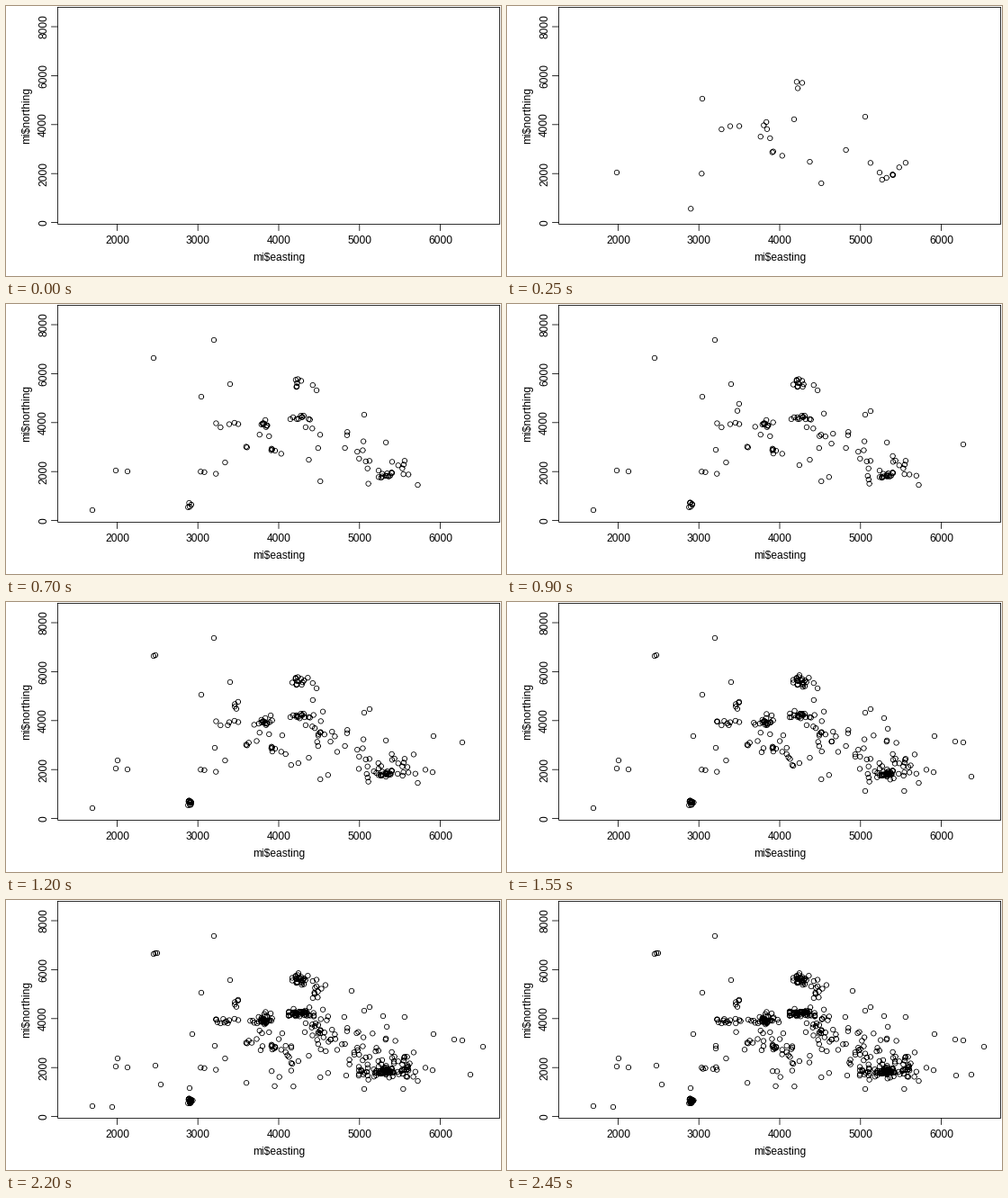
A matplotlib script that plays this animation: 550x300 px, repeating every 2.5 s.

```python
import numpy as np
import matplotlib.pyplot as plt
from matplotlib.animation import FuncAnimation

W, H, DPI = 550, 300, 100
PX = 72 / DPI  # points per pixel
FRAMES, STEP = 50, 50
RADIUS, STROKE = 2.7, 0.8
LEFT, RIGHT, TOP, BOTTOM = 57.6, 548.6, 1.4, 242.4
TICK = 7.2

plt.rcParams.update({"font.family": "Liberation Sans", "path.simplify": False})

# Lone sightings in order of arrival, in pixels.
OUTLIERS = np.array([
    (398, 123), (122, 185), (217, 103), (164, 60), (135, 186), (96, 229),
    (249, 89), (231, 40), (404, 119), (507, 156),
    (166, 59), (475, 149), (124, 176),
    (498, 155), (207, 149), (419, 129), (516, 194),
    (118, 230), (168, 59), (166, 184),
    (530, 163), (172, 205), (384, 101), (204, 209), (499, 195),
])

# Busy areas: centre, spread and weight.
AREAS = np.array([
    (328, 88, 5, 4, 28),
    (346, 101, 5, 7, 18),
    (328, 126, 7, 3, 36),
    (290, 132, 6, 3, 32),
    (253, 134, 13, 1.5, 26),
    (257, 116, 3, 3, 9),
    (350, 142, 9, 13, 34),
    (301, 161, 8, 4, 20),
    (228, 187, 7, 2, 10),
    (205, 223, 1.5, 1.5, 14),
    (424, 191, 5, 2.5, 40),
    (442, 188, 12, 7, 38),
    (402, 192, 12, 4, 24),
    (410, 170, 32, 20, 50),
    (300, 165, 34, 24, 40),
])


def total(frame):
    """Clustered points visible so far; they arrive slightly faster with time."""
    return int(5.5 * frame + 0.05 * frame ** 2)


def scatter(n, rng):
    """Random points drawn around the busy areas."""
    weight = AREAS[:, 4] / AREAS[:, 4].sum()
    area = AREAS[rng.choice(len(AREAS), n, p=weight)]
    shift = np.clip(rng.normal(size=(n, 2)), -2, 2)
    return area[:, :2] + shift * area[:, 2:4]


def rings(centres):
    """Outlines of all circles as one line, broken by NaN."""
    turn = np.append(np.linspace(0, 2 * np.pi, 33), np.nan)
    x = centres[:, :1] + RADIUS * np.cos(turn)
    y = centres[:, 1:] + RADIUS * np.sin(turn)
    return x.ravel(), y.ravel()


def line(xs, ys):
    return ax.plot(xs, ys, color="black", lw=STROKE * PX, snap=False,
                   solid_capstyle="round")[0]


def label(x, y, text, angle=0):
    ax.text(x, y, text, fontsize=12 * PX, rotation=angle, color="black",
            rotation_mode="anchor", ha="center", va="baseline",
            parse_math=False)


fig = plt.figure(figsize=(W / DPI, H / DPI), dpi=DPI, facecolor="white")
ax = fig.add_axes([0, 0, 1, 1])
ax.set_xlim(0, W)
ax.set_ylim(H, 0)
ax.axis("off")

line([LEFT, RIGHT, RIGHT, LEFT, LEFT], [TOP, TOP, BOTTOM, BOTTOM, TOP])
for k in range(5):
    x = 123.4 + 89.8 * k
    line([x, x], [BOTTOM, BOTTOM + TICK])
    label(x, 264, str(2000 + 1000 * k))
    y = 240.6 - 54.4 * k
    line([LEFT - TICK, LEFT], [y, y])
    label(45, y, str(2000 * k), 90)
label(303, 283, "mi$easting")
label(26, 121.5, "mi$northing", 90)

crowd = scatter(total(FRAMES), np.random.default_rng(7))
dots = line([], [])


def draw(frame):
    lone = OUTLIERS[1.9 * np.arange(len(OUTLIERS)) + 1 < frame + 1]
    seen = np.vstack([lone, crowd[:total(frame)]])
    dots.set_data(*rings(seen))
    return dots,


anim = FuncAnimation(fig, draw, frames=FRAMES, interval=STEP,
                     repeat=True, repeat_delay=0)
plt.show()
```
